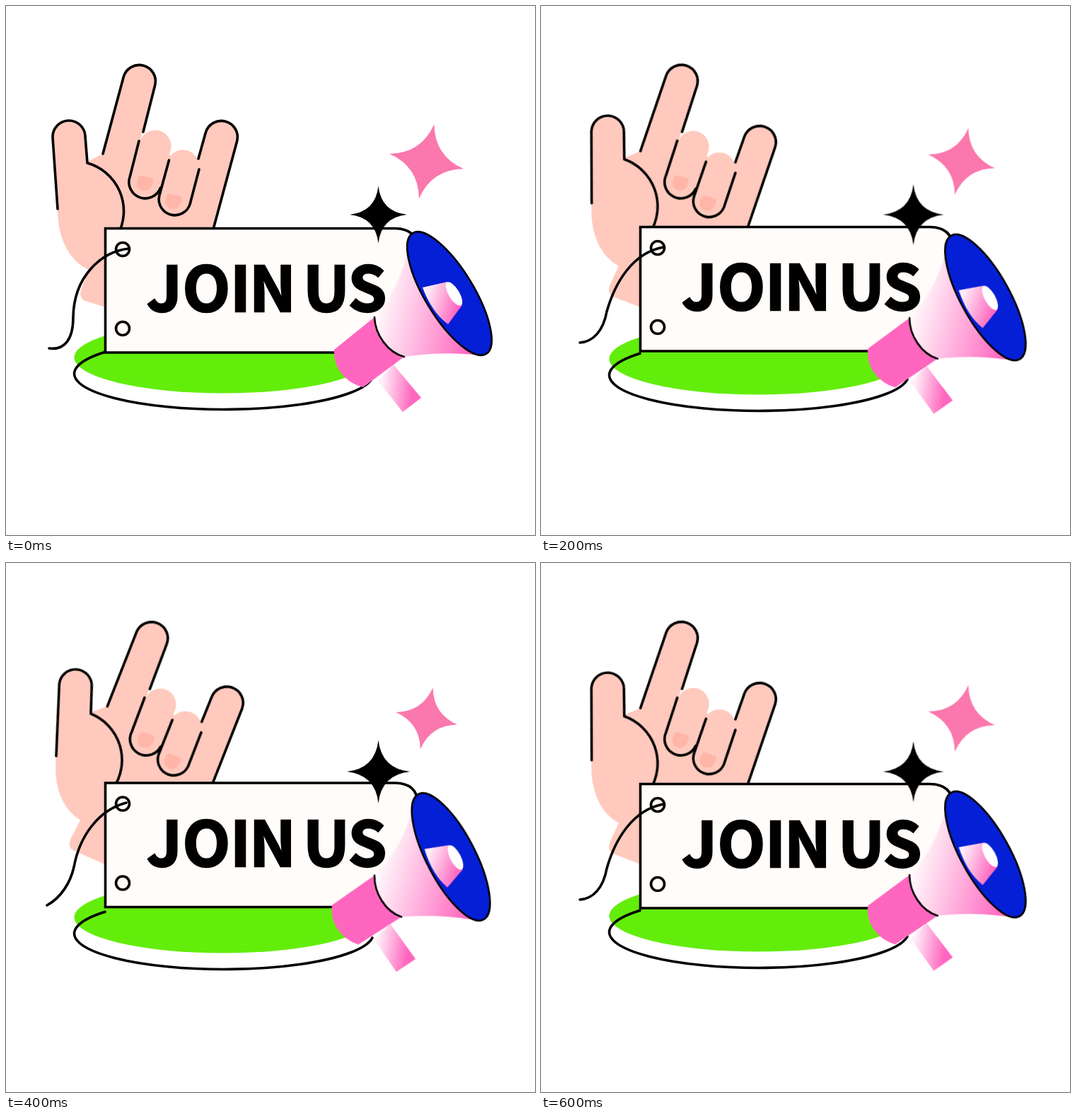
Animation of 748 by 748 pixels, one loop 0.8 s. Source, as an HTML page:

```html
<!DOCTYPE html>
<html lang="en">
<head>
<meta charset="utf-8">
<title>Join us</title>
<style>
  html, body { margin: 0; width: 100%; height: 100%; overflow: hidden; background: #fff; }
  svg { display: block; width: 100%; height: 100%; }
  .line { fill: none; stroke: #000; stroke-width: 3.6; stroke-linecap: round; stroke-linejoin: round; }
  .skin { fill: #ffc9bd; }
  .finger { fill: none; stroke: #ffc9bd; stroke-linecap: round; }
  .nail { fill: #ffb5a8; }
  .title {
    font: 700 88px "Noto Sans CJK JP", "Noto Sans CJK SC", "Noto Sans CJK KR", "Noto Sans CJK", "Noto Sans", sans-serif;
    text-anchor: middle; stroke: #000; stroke-width: 2.4;
  }
  #hand { transform-origin: 197px 262px; }
  #horn { transform-origin: 496px 442px; }
  #dark { transform-origin: 526.5px 295px; }
  #rose { transform-origin: 594.7px 219.7px; }
</style>
</head>
<body>
<svg viewBox="0 0 748 748">
  <defs>
    <linearGradient id="cone" gradientUnits="userSpaceOnUse" x1="530" y1="427" x2="662" y2="455">
      <stop offset="0" stop-color="#fff6fa"/>
      <stop offset="1" stop-color="#ff66bf"/>
    </linearGradient>
    <linearGradient id="grip" gradientUnits="userSpaceOnUse" x1="531" y1="540" x2="575" y2="544">
      <stop offset="0" stop-color="#fff0f8"/>
      <stop offset="1" stop-color="#ff66bf"/>
    </linearGradient>
    <linearGradient id="mouth" gradientUnits="userSpaceOnUse" x1="592" y1="410" x2="640" y2="424">
      <stop offset="0" stop-color="#fff0f8"/>
      <stop offset="1" stop-color="#ff66bf"/>
    </linearGradient>
  </defs>

  <g id="hand">
    <path class="skin" d="M73 287L66 186A23 23 0 0 1 112 184L115 220L137 209L188 190L211 200L260 225L272 218L305 240L294 314L285 345L200 444L141 426L112 417Q103 413 106 402L117 373C92 362 73 332 73 287Z"/>
    <path class="finger" stroke-width="46" d="M188.5 106L161 209M304.5 185L276 293"/>
    <path class="finger" stroke-width="45" d="M211 198L197.5 247M250 226L238.5 274.5"/>
    <path id="nail" class="nail" d="M187 243Q188 239 193 240L205 243Q209 244 208 248Q205 262 194 261Q181 258 187 243Z"/>
    <use href="#nail" x="40.5" y="26"/>
    <path class="line" d="M73 287L66 186A23 23 0 0 1 112 184L115 222A70.6 70.6 0 0 1 158.300 323"/>
    <path class="line" d="M137 209L166.3 100A23 23 0 0 1 210.7 112L194 178"/>
    <path class="line" d="M272 216L282.3 179A23 23 0 0 1 326.7 191L293.5 314L287.5 336"/>
    <path class="line" d="M188 191L175.300 241A23 23 0 0 0 218.500 257"/>
    <path class="line" d="M230.500 218L216.700 268.500A22.500 22.500 0 0 0 260 280.500L273 231"/>
  </g>

  <g id="ground">
    <ellipse cx="307" cy="497" rx="210.5" ry="50.5" fill="#63ed0b"/>
    <path class="line" d="M140 489.3A211.5 50.5 0 1 0 518 526"/>
  </g>

  <g id="card">
    <path class="line" style="fill:#fffcf9;stroke-linejoin:miter" d="M140.5 314.5H550Q582 315 582 344V490H140.5Z"/>
    <circle class="line" cx="165" cy="344" r="9.5"/>
    <circle class="line" cx="165" cy="456" r="9.5"/>
    <text class="title" x="224 283.5 331.5 377 415 453 511" y="432.4">JOIN US</text>
  </g>

  <path id="cord" class="line"/>
  <path id="rose" fill="#fa78ad"/>
  <path id="dark"/>

  <g id="horn">
    <path fill="url(#grip)" d="M526 530L548 507L587 554L561 574Z"/>
    <path fill="#ff66bf" d="M521 440L464 486C462 511 480 533 505 539L563 496Z"/>
    <path fill="url(#cone)" d="M568 345C558 390 540 420 521 440C522 465 540 490 563 496C600 490 640 490 668 494L640 420Z"/>
    <path class="line" style="stroke-width:2.6" d="M521 440C522 465 540 490 563 496"/>
    <ellipse cx="627" cy="406.5" rx="100" ry="34.5" transform="rotate(58.7 627 406.5)" fill="#051fd6" stroke="#000" stroke-width="2.6"/>
    <path fill="url(#mouth)" d="M589 398L624 390L645 423L625 450Q602 433 589 398Z"/>
    <ellipse cx="633.5" cy="407" rx="19" ry="7.5" transform="rotate(58.7 633.5 407)" fill="#fff"/>
  </g>
</svg>
<script>
const LOOP = 800;
const ORDER = [0, 1, 2, 1, 0];
const $ = id => document.getElementById(id);

// Four-pointed star with inward curves; pinch is the control point's share of the radius.
function star(cx, cy, radius, turn, pinch) {
  const at = (r, deg) => {
    const a = (deg + turn) * Math.PI / 180;
    return `${(cx + r * Math.cos(a)).toFixed(2)} ${(cy + r * Math.sin(a)).toFixed(2)}`;
  };
  let d = "M" + at(radius, 0);
  for (let k = 0; k < 4; k++) {
    d += `Q${at(radius * pinch * Math.SQRT2, k * 90 + 45)} ${at(radius, k * 90 + 90)}`;
  }
  return d + "Z";
}
$("dark").setAttribute("d", star(526.5, 295, 40.5, 0, 0.1));
$("rose").setAttribute("d", star(594.7, 219.7, 53.5, 11.5, 0.18));

// Holds each of three poses, swinging there and back.
function hold(id, prop, poses, format) {
  const frames = ORDER.map((p, i) => ({
    offset: i / 4,
    easing: "steps(1, end)",
    [prop]: format(poses[p])
  }));
  $(id).animate(frames, { duration: LOOP, iterations: Infinity });
}
const turn = v => `rotate(${v}deg)`;
const lift = v => `translateY(${v}px)`;
const grow = v => `scale(${v})`;

hold("hand", "transform", [0, 3.75, 6.4], turn);
hold("horn", "transform", [0, 2.4, 3.9], turn);
hold("card", "transform", [0, -2, -3.5], lift);
hold("ground", "transform", [0, 2, 4], lift);
hold("dark", "transform", [1, 1.06, 1.1], grow);
hold("rose", "transform", [1, 0.9, 0.83], grow);
hold("cord", "d", [
  "M174 343C135 347 96 382 95 440C95 470 84 487 61 484",
  "M173 341C130 349 105 390 93 432C88 460 73 475 55 476",
  "M170 339C131 349 104 386 96 430C91 452 78 473 58 484"
], d => `path("${d}")`);
</script>
</body>
</html>
```
